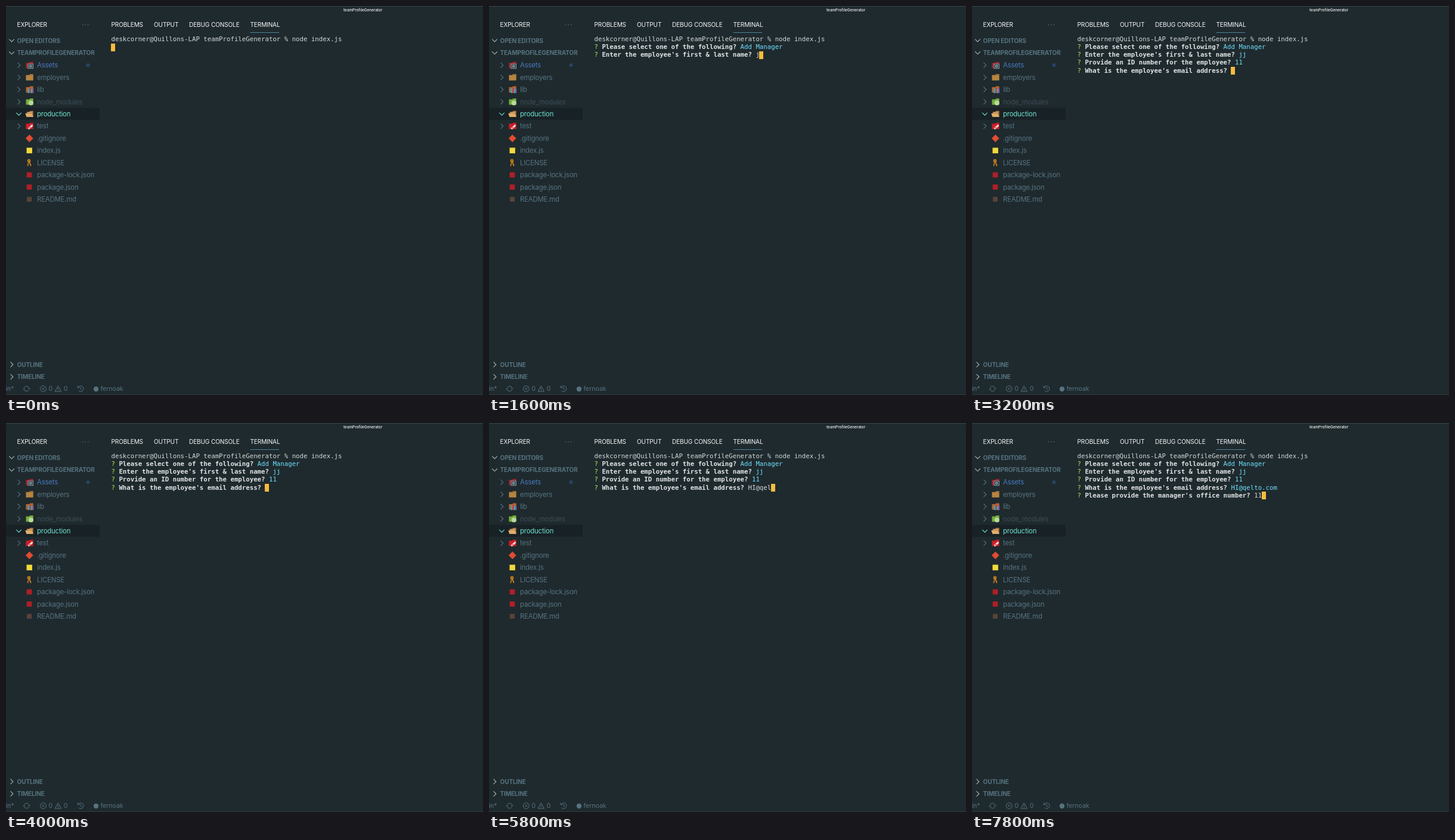
Recreate the animation shown at these times as an HTML page with a canvas. Size 800 by 652 pixels, loop 8000 ms.

```html
<!DOCTYPE html>
<html lang="en">
<head>
<meta charset="utf-8">
<title>Terminal session</title>
<style>
html, body { margin: 0; width: 100%; height: 100%; overflow: hidden; background: #1f2a2e; }
canvas { display: block; width: 800px; height: 652px; }
</style>
</head>
<body>
<canvas id="stage" width="800" height="652"></canvas>
<script>
const ctx = document.getElementById('stage').getContext('2d');
const LOOP = 8000;
const SANS = 'Inter, "Open Sans", sans-serif';
const MONO = '"DejaVu Sans Mono", "Liberation Mono", monospace';
const C = {
  bg: '#1f2a2e', row: '#182125', muted: '#567380', dim: '#3b4c55', chevron: '#a3b3b9',
  white: '#f6f8f8', bold: '#e0e4e5', term: '#d3d8d9', grey: '#6c777a', cyan: '#6fe0ff',
  green: '#b4e650', teal: '#6ee0cf', blue: '#4a78be', cursor: '#fabb3d'
};

// Terminal grid
const X0 = 176.5, Y0 = 59, COL = 6.45, LINE = 13.15;

const pick = 'Please select one of the following?';
const menu = ['Add Manager', 'Add Engineer', 'Add Intern', 'Exit'];
const MENU_AT = 200, PICK_AT = 1200;
const steps = [
  { at: 1200, done: 2200, ask: "Enter the employee's first & last name?", reply: 'jj', key: i => 1600 + 200 * i },
  { at: 2200, done: 3200, ask: 'Provide an ID number for the employee?', reply: '11', key: i => 2600 + 200 * i },
  { at: 3200, done: 7200, ask: "What is the employee's email address?", reply: 'HI@qelto.com',
    key: i => (i < 2 ? 4200 : 4800) + 200 * i },
  { at: 7200, done: LOOP, ask: "Please provide the manager's office number?", reply: '11', key: i => 7600 + 200 * i }
];

function label(str, x, y, size, color, weight = 400, spacing = 0) {
  ctx.font = `${weight} ${size}px ${SANS}`;
  ctx.letterSpacing = spacing + 'px';
  ctx.fillStyle = color;
  ctx.fillText(str, x, y);
}

function mono(str, col, line, color, weight = 400) {
  ctx.font = `${weight} 10.72px ${MONO}`;
  ctx.letterSpacing = '0px';
  ctx.fillStyle = color;
  [...str].forEach((ch, i) => ctx.fillText(ch, X0 + (col + i) * COL, Y0 + line * LINE));
}

function cursor(col, line) {
  box(Math.round(X0 + col * COL - 0.4), Math.floor(Y0 + line * LINE - 9.1), 7, 13, C.cursor);
}

function box(x, y, w, h, color) {
  ctx.fillStyle = color;
  ctx.fillRect(x, y, w, h);
}

function disc(x, y, r, color) {
  ctx.fillStyle = color;
  ctx.beginPath();
  ctx.arc(x, y, r, 0, 7);
  ctx.fill();
}

function arc(x, y, r, from, to, color) {
  ctx.strokeStyle = color;
  ctx.lineWidth = 1;
  ctx.beginPath();
  ctx.arc(x, y, r, from, to);
  ctx.stroke();
}

function path(pts, color, width = 1, close = false) {
  ctx.strokeStyle = color;
  ctx.lineWidth = width;
  ctx.beginPath();
  pts.forEach(([x, y]) => ctx.lineTo(x, y));
  if (close) ctx.closePath();
  ctx.stroke();
}

function shape(pts, color) {
  ctx.fillStyle = color;
  ctx.beginPath();
  pts.forEach(([x, y]) => ctx.lineTo(x, y));
  ctx.fill();
}

function chevron(x, y, open, color) {
  path(open ? [[x - 4.3, y - 2], [x, y + 2.3], [x + 4.3, y - 2]]
            : [[x - 2, y - 4.3], [x + 2.3, y], [x - 2, y + 4.3]], color, 1.1);
}

function folder(y, color) {
  shape([[33.5, y - 4], [39, y - 4], [40.3, y - 5.5], [45.7, y - 5.5], [45.7, y + 5], [33.5, y + 5]], color);
}

const icons = {
  image(y) {
    folder(y, '#a3262f');
    box(36.5, y - 2.5, 9.5, 8.5, '#8497a0');
    box(37.5, y - 1.5, 7.5, 6.5, '#38464e');
    disc(41.2, y + 1.7, 2.2, '#9aacb3');
    disc(41.2, y + 1.7, 1, '#38464e');
  },
  plain(y) {
    folder(y, '#b58440');
    path([[39.5, y - 3.7], [45.7, y - 3.7]], '#8f6429', 0.8);
  },
  books(y) {
    folder(y, '#b3662f');
    box(36.5, y - 2, 2.6, 8, '#3c9fb5');
    box(39.4, y - 3, 2.4, 9, '#bd3f4a');
    box(42, y - 1, 2.2, 7, '#41a9c3');
    box(44.3, y - 2, 2, 8, '#7f5598');
  },
  modules(y) {
    folder(y, '#73ad3c');
    disc(41.8, y + 2, 4, '#b9d99a');
  },
  open(y) {
    shape([[34.5, y - 3.5], [39, y - 3.5], [40.3, y - 5.2], [45.7, y - 5.2], [45.7, y + 5], [34.5, y + 5]], '#b0743a');
    shape([[32.3, y - 0.8], [43.3, y - 0.8], [45.7, y + 5], [34.4, y + 5]], '#dfae6b');
    path([[36, y - 2.5], [44, y - 2.5]], '#e6c796', 1);
  },
  tube(y) {
    folder(y, '#cf1e27');
    path([[37.5, y + 4.8], [44.5, y - 1.7]], '#f0dede', 2.8);
    path([[38.5, y + 3.9], [41, y + 1.6]], '#d94a50', 1.4);
  },
  git(y) {
    shape([[39.3, y - 6.4], [45.7, y], [39.3, y + 6.4], [32.9, y]], '#df4c32');
  },
  script(y) { box(34.5, y - 4.7, 9.4, 9.4, '#f1d83c'); },
  key(y) {
    disc(38.5, y - 3.5, 2.7, '#d98b20');
    disc(38.5, y - 4, 0.9, C.bg);
    path([[37.8, y - 1], [36.3, y + 5.8]], '#c57b1b', 1.7);
    path([[39.3, y - 1], [41.8, y + 5.5]], '#d98b20', 1.7);
  },
  pack(y) { box(34.7, y - 4.3, 8.6, 8.6, '#b01f26'); },
  note(y) { box(35, y - 4, 8, 8, '#594339'); }
};

const files = [
  ['Assets', 'image', C.blue], ['employers', 'plain'], ['lib', 'books'],
  ['node_modules', 'modules', C.dim], ['production', 'open', C.teal], ['test', 'tube'],
  ['.gitignore', 'git'], ['index.js', 'script'], ['LICENSE', 'key'],
  ['package-lock.json', 'pack'], ['package.json', 'pack'], ['README.md', 'note']
];

function sidebar() {
  label('EXPLORER', 18.5, 34.8, 10.1, C.white, 400, -0.15);
  for (let i = 0; i < 3; i++) disc(128.5 + i * 4.6, 31.5, 0.8, C.muted);

  const heads = [['OPEN EDITORS', 57.7, true], ['TEAMPROFILEGENERATOR', 78.5, true],
                 ['OUTLINE', 601, false], ['TIMELINE', 621.5, false]];
  for (const [name, y, open] of heads) {
    chevron(9.5, y, open, C.chevron);
    label(name, 18.5, y + 3.8, 10.1, C.muted, 700, -0.14);
  }

  files.forEach(([name, icon, color = C.muted], i) => {
    const y = 99.2 + i * 20.43;
    const active = name === 'production';
    if (active) box(0, y - 10.2, 157, 20, C.row);
    if (i < 6) chevron(21.5, y, active, active ? C.teal : C.muted);
    icons[icon](y);
    label(name, 52, y + 4.1, 11.4, color, 400, -0.2);
  });
  arc(137.5, 99.2, 2.6, 0, 7, '#304f80');
  disc(137.5, 99.2, 1.4, '#304f80');
}

function statusBar() {
  const y = 641.5, c = C.muted;
  label('in*', -0.5, y + 3.9, 10.6, c);

  arc(34.5, y, 4.3, 3.5, 6, c);
  arc(34.5, y, 4.3, 0.35, 2.85, c);
  path([[37, y - 0.8], [38.8, y + 0.6], [40.7, y - 1.4]], c);
  path([[28.4, y + 1.4], [30.2, y - 0.6], [32, y + 0.8]], c);

  arc(62.3, y, 5, 0, 7, c);
  path([[60.2, y - 2.1], [64.4, y + 2.1]], c);
  path([[64.4, y - 2.1], [60.2, y + 2.1]], c);
  label('0', 71.5, y + 3.9, 10.6, c);

  path([[87.3, y - 4.8], [92.5, y + 4.6], [82.1, y + 4.6]], c, 1, true);
  path([[87.3, y - 1.5], [87.3, y + 1.7]], c);
  path([[87.3, y + 2.5], [87.3, y + 3.5]], c);
  label('0', 96.8, y + 3.9, 10.6, c);

  arc(125.2, y, 4.8, -2.7, 2.4, c);
  path([[119.9, y - 4.8], [120.4, y - 1.7], [123.5, y - 2]], c);
  path([[125.2, y - 2.6], [125.2, y + 0.3], [127.2, y + 2]], c);

  disc(151, y + 0.5, 4.2, c);
  label('fernoak', 158.5, y + 3.9, 10.6, c, 400, -0.05);
}

function panelTabs() {
  const tabs = [['PROBLEMS', 176.5], ['OUTPUT', 248], ['DEBUG CONSOLE', 307], ['TERMINAL', 409.5]];
  for (const [name, x] of tabs) label(name, x, 34.8, 10.1, C.white, 400, -0.15);
  box(409.5, 44, 48.7, 1, '#4b8496');
}

function question(text, line) {
  mono('?', 0, line, C.green);
  mono(text, 2, line, C.bold, 700);
  return text.length + 3;
}

function terminal(t) {
  mono('deskcorner@Quillons-LAP teamProfileGenerator % node index.js', 0, 0, C.term);
  if (t < MENU_AT) return cursor(0, 1);

  const col = question(pick, 1);
  if (t < PICK_AT) {
    mono('(Use arrow keys)', col, 1, C.grey);
    const y = Y0 + 2 * LINE - 3.7;
    path([[178, y - 4], [181.3, y], [178, y + 4]], C.cyan, 1.8);
    menu.forEach((item, i) => mono(item, 2, i + 2, i ? C.term : C.cyan));
    return;
  }
  mono(menu[0], col, 1, C.cyan);

  steps.forEach((s, i) => {
    if (t < s.at) return;
    const line = i + 2, start = question(s.ask, line);
    const typed = [...s.reply].filter((ch, k) => t >= s.key(k)).join('');
    const done = t >= s.done;
    mono(typed, start, line, done ? C.cyan : C.term);
    if (!done) cursor(start + typed.length, line);
  });
}

function draw(now) {
  box(0, 0, 800, 652, C.bg);
  box(0, 0, 800, 1, '#35474c');
  box(0, 651, 800, 1, '#2c3b40');
  label('teamProfileGenerator', 566, 9.3, 6.35, C.white, 500);
  sidebar();
  statusBar();
  panelTabs();
  terminal(now % LOOP);
}

const begin = performance.now();
function tick() {
  draw(performance.now() - begin);
  requestAnimationFrame(tick);
}
tick();
</script>
</body>
</html>
```
